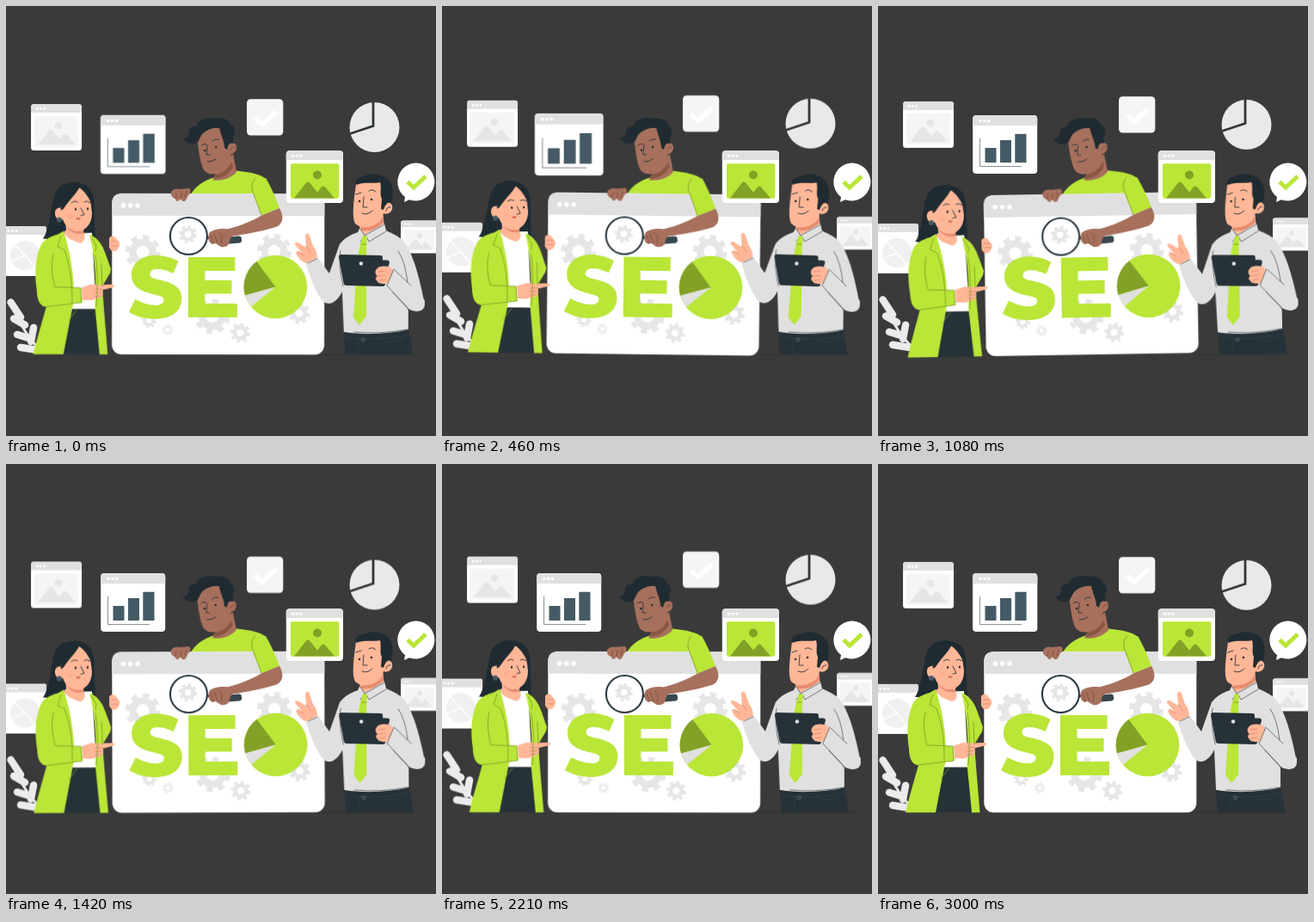
Recreate the animation shown at these times as an HTML page. Size 500 px wide and 500 px high, loop 3040 ms.

```html
<!DOCTYPE html>
<html lang="en">
<head>
<meta charset="utf-8">
<title>SEO team</title>
<style>
  html, body { margin: 0; width: 100%; height: 100%; overflow: hidden; background: #3a3a3a; }
  svg { display: block; width: 100vw; height: 100vh; }

  .sway { animation: sway 1520ms linear -35ms infinite; transform-origin: 250px 250px; }
  .sway.solo { transform-origin: 420px 250px; }
  .float { animation: float 1520ms linear infinite; }
  .beat { animation: beat 3040ms linear infinite; transform-origin: 147.7px 161px; }

  @keyframes sway {
    0%, 100% { transform: rotate(0deg); }
    25% { transform: rotate(1deg); }
    75% { transform: rotate(-1deg); }
  }
  @keyframes float {
    0%, 100% { transform: translateY(0); }
    48% { transform: translateY(-6.8px); }
    70.4% { transform: translateY(-3.2px); }
    97% { transform: translateY(-.2px); }
  }
  @keyframes beat {
    0% { transform: scale(1.007); }
    10% { transform: scale(1.09); }
    27%, 98% { transform: scale(1); }
    100% { transform: scale(1.005); }
  }

  .lime { fill: #b9e637; }
  .olive { fill: #82a126; }
  .navy { fill: #263238; }
  .hair { fill: #1f2b31; }
  .white { fill: #fff; }
  .bar { fill: #e0e0e0; }
  .pane { fill: #f5f5f5; }
  .hill { fill: #e6e6e6; }
  .shirt { fill: #e0e0e0; }
  .peach { fill: #ffb797; }
  .brown { fill: #a6705d; }
  .ink { fill: none; stroke: #263238; stroke-width: .9; stroke-linecap: round; stroke-linejoin: round; }
  .fold { fill: none; stroke: #7d9c25; stroke-width: .8; stroke-linecap: round; }
  .crease { fill: none; stroke: #263238; stroke-width: .6; stroke-linecap: round; }
  .knuckle { fill: none; stroke: #dd8269; stroke-width: .8; stroke-linecap: round; }
  .dusk { fill: none; stroke: #764938; stroke-width: .8; stroke-linecap: round; }
</style>
</head>
<body>
<svg viewBox="0 0 500 500" role="img" aria-label="SEO">
  <defs>
    <g id="gear" fill="none" stroke="#e6e6e6">
      <circle r="5.6" stroke-width="4"/>
      <circle r="8.4" stroke-width="3.2" pathLength="16" stroke-dasharray="1.05 .95"/>
    </g>
    <g id="dots" class="white">
      <circle r="1.7"/><circle cx="5" r="1.7"/><circle cx="10" r="1.7"/>
    </g>
    <path id="peaks" d="M0 25L14 7Q16 5 18 7L27 18L32 12Q34 10 36 12L47 25Z"/>
  </defs>

  <path d="M366 405.3H480" stroke="#303030" stroke-width=".7"/>

  <!-- Drifting windows, plant and pie chart -->
  <g class="float">
    <rect x="-6" y="256" width="53" height="58" rx="3" class="white"/>
    <path d="M-6 266V259Q-6 256-3 256H44Q47 256 47 259V266Z" class="bar"/>
    <use href="#dots" transform="translate(3 261.5) scale(.9)"/>
    <circle cx="22" cy="290" r="17" fill="#f0f0f0"/>
    <path d="M22 290L10 278M22 290L6 297M22 290L33 303" fill="none" stroke="#fff" stroke-width="1.6"/>

    <rect x="29" y="114" width="59" height="54" rx="3.5" class="white"/>
    <path d="M29 124V117.5Q29 114 32.5 114H84.5Q88 114 88 117.5V124Z" class="bar"/>
    <use href="#dots" transform="translate(36 119.500) scale(.85)"/>
    <rect x="33" y="128" width="51" height="36" rx="1.5" class="pane"/>
    <use href="#peaks" transform="translate(37 138) scale(.93)" class="hill"/>
    <circle cx="61" cy="139" r="4.3" class="hill"/>

    <rect x="280" y="108.300" width="42.300" height="42.300" rx="4.5" class="pane"/>
    <path d="M289.500 130L298 138L314 122.500" fill="none" stroke="#fff" stroke-width="5.5"/>

    <rect x="459" y="249.500" width="48" height="38" rx="3" class="white"/>
    <path d="M459 257V252.5Q459 249.5 462 249.5H507V257Z" class="bar"/>
    <use href="#dots" transform="translate(464 253.500) scale(.65)"/>
    <rect x="463" y="260.500" width="35" height="23.500" rx="1" class="pane"/>
    <use href="#peaks" transform="translate(465.500 267) scale(.65)" class="hill"/>
    <circle cx="481" cy="267" r="3" class="hill"/>

    <g fill="none" stroke="#ebebeb" stroke-linecap="round">
      <path d="M8 347Q18 380 42 402" stroke-width="3"/>
      <path d="M5.500 344.500L17 362M9 363.500L22 371M13 382L29 387M17 397L36 400M32 374L29 390" stroke-width="8.5"/>
    </g>

    <circle cx="428.500" cy="141" r="29" fill="#e9e9e9"/>
    <path d="M427 111.500V139.500L400 148.500" fill="none" stroke="#303638" stroke-width="2.8"/>
  </g>

  <!-- Bar chart -->
  <g class="beat">
    <rect x="110.200" y="127" width="75" height="68" rx="4" class="white"/>
    <path d="M110.200 139V131Q110.200 127 114.200 127H181.200Q185.200 127 185.200 131V139Z" class="bar"/>
    <use href="#dots" transform="translate(118.700 133.500)"/>
    <path d="M118.500 154V186.500H167" fill="none" stroke="#78858b" stroke-width=".9"/>
    <path d="M124.500 165H137.500V182H124.500ZM142 156H155V182H142ZM159.300 148.700H172.500V182H159.300Z" fill="#455a64"/>
  </g>

  <g class="sway">
    <!-- Man behind the board -->
    <path class="lime" d="M213 222C220 209 231 202 244 199L268 191.5C284 193 297 196 302 201L310 222Z"/>
    <path class="brown" d="M246 190L264 172L268 193C262 200 251 204 240 202.5Z"/>
    <path d="M243 196C253 194 259 189 262 181L264 187C259 196 250 201 242 201Z" fill="#8a5745"/>
    <path class="brown" d="M222 152C224 170 226 184 230 191C236 198 246 196 252 191L260 180L262 172C268 171 270 163 266 160C262 157 258 160 257 163L254 145L240 138L228 142Z"/>
    <path class="hair" d="M223 158C216 163 209 160 205 153C209 155 212 152 213 148C211 143 217 139 221 140C224 131 234 128 243 131C252 129 261 133 261 138C267 141 267 148 264 152L264 160C260 158 258 161 257 167L254 165C254 158 250 151 248 142C240 141 232 145 228 149C226 151 225 155 223 158Z"/>
    <path class="ink" d="M227 162Q230 159 233 161M240 157Q243 154 247 155M234 162L233 173L237 173M234 181Q239 182 244 178"/>
    <circle cx="231" cy="168" r="1.200" class="hair"/><circle cx="244" cy="164" r="1.200" class="hair"/>
    <path class="dusk" d="M261 167Q263 163 266 164"/>

    <!-- Board -->
    <rect x="123.300" y="218.300" width="247" height="187" rx="11" class="white"/>
    <path class="bar" d="M123.300 244V229.300Q123.300 218.300 134.300 218.300H359.300Q370.300 218.300 370.300 229.300V244Z"/>
    <use href="#dots" transform="translate(136.500 232) scale(1.650)"/>
    <use href="#gear" transform="translate(159 286.500) scale(2.050)"/>
    <use href="#gear" transform="translate(312 285) scale(2)"/>
    <use href="#gear" transform="translate(240 361) scale(2.050)"/>
    <use href="#gear" transform="translate(272.500 380) scale(1.150)"/>
    <use href="#gear" transform="translate(341 357) scale(1.250)"/>
    <use href="#gear" transform="translate(166.500 366) scale(.85)"/>
    <use href="#gear" transform="translate(188 376.500) scale(.65)" opacity=".7"/>

    <!-- Lettering, with a pie as the O -->
    <g transform="translate(-.5 -1)">
      <g class="lime">
        <path d="M201 298C192 293 183 291 175 291C157 291 146.500 301 146.500 314C146.500 329 160 333 171 336C180 338 184 339 184 343C184 347 180 349 174 349C166 349 158 346 151 342L143.500 357C151 362 162 365 174 365C193 365 205 356 205 341C205 327 193 323 181 320C172 318 168 317 168 313C168 309 171 307 177 307C183 307 189 309 195 312Z"/>
        <path d="M212.500 293H267V309H232V320H263V335.500H232V347H269.500V363H212.500Z"/>
        <circle cx="314" cy="327.500" r="36.800"/>
      </g>
      <path class="olive" d="M314 327.500L292 298A36.800 36.800 0 0 0 278.500 337.500Z"/>
      <path class="shirt" d="M314 327.500L278.500 337.500A36.800 36.800 0 0 0 285.500 350.700Z"/>
    </g>

    <!-- Arm, magnifier and gripping fingers -->
    <path class="lime" d="M274 204L302 200C309 212 315 226 318 235L297 243.500L287 218Z"/>
    <path class="brown" d="M297 243.500L318 235C323 244 323 252 315 256.500C302 261 285 264 268 267L257 268L254 260C270 257 286 250 297 243.500Z"/>
    <path class="fold" d="M286 213Q285 204 290 200M297 243L286 213"/>
    <path d="M234 269.500L262 271" stroke="#263238" stroke-width="3"/>
    <rect x="256" y="268" width="18" height="8" rx="3" fill="#37474f" transform="rotate(-4 265 272)"/>
    <path class="brown" d="M237 263C243 259 253 258 258 260L267 264L261 270L259 277C256 281 251 281 248 279L244 276L240 277C235 275 234 268 237 263Z"/>
    <path class="dusk" d="M238 267L241 275M242 265L246 276M248 264Q253 267 250 276"/>
    <circle cx="212.400" cy="267.500" r="21.500" fill="#fff" stroke="#2b3940" stroke-width="2.100"/>
    <use href="#gear" transform="translate(211.500 265.500) scale(1.060)"/>
    <path class="brown" d="M192 217C193 213 198 212 202 213L213 212C216 215 214 219 212 220L209 226C206 229 204 226 203 224C201 228 197 228 197 224C194 224 191 220 192 217Z"/>
    <path class="dusk" d="M198 218L197 224M204 217L203 224M210 216L208 223"/>

    <!-- Woman -->
    <path class="hair" d="M61 212C70 202 92 203 99 215C104 224 102 237 103 250L104 271H43C50 260 51 244 54 231C55 222 57 216 61 212Z"/>
    <path class="white" d="M66 265L100 264L105 353H72Z"/>
    <path class="peach" d="M69 247L91 253L90 263C93 268 92 273 87 276C77 274 68 268 67 263L70 261Z"/>
    <path d="M73 256Q80 263 90 262L90 265Q78 267 71 258Z" fill="#e88c70"/>
    <path class="peach" d="M63 235C57 234 55 242 59 247C62 251 65 250 66 248C69 258 77 263 85 262C94 261 100 252 100 241L98 224C94 216 88 212 82 211L68 222Z"/>
    <path class="hair" d="M86 210C81 220 73 226 67 236L64 238C63 230 60 225 66 214C73 206 82 206 86 210ZM84 210C90 215 97 222 100 233L102 224L93 209Z"/>
    <circle cx="62" cy="249" r="3" fill="#455a64"/>
    <path class="ink" d="M76 229Q79 226 83 228M91 228Q95 226 98 229M87 235L91 243L87 244"/>
    <path d="M81 247Q84 246 87 247Q84 251 81 247Z" fill="#d9604c"/>
    <ellipse cx="81" cy="236.500" rx="1.100" ry="1.600" class="hair"/><ellipse cx="95" cy="236" rx="1.100" ry="1.600" class="hair"/>
    <circle cx="75" cy="245" r="3" fill="#f79d80" opacity=".4"/>
    <path class="navy" d="M77 352.500H104L110 405.300H66Z"/>
    <path class="lime" d="M97 266C106 269 112 277 116 289L122 306L121 311L112 326L114 352L118.500 405.300H109L103.500 349C106 320 103 288 97 266Z"/>
    <path class="lime" d="M67 262C76 290 81 322 78 348L67 405.300H32C37 384 43 365 47 350C39 350 36 340 36 331C33 312 34 294 40 280C43 272 52 268 60 266Z"/>
    <path class="lime" d="M41 328H87L89 345L48 350C41 350 37 344 37 335Z"/>
    <path class="peach" d="M88 327.500L99 324L109 324.500L124 324C127 324.500 127 326.500 124 327.500L112 330.500C114 333 112 339 109 340L99 342.500L89 342Z"/>
    <path class="knuckle" d="M103 330L112 329.500M103 334L111 333.500M103 338L110 337.500"/>
    <path class="fold" d="M55 289Q51 306 57 327L87 328L88 345L47 350M64 268L60 280L68 284Q78 310 77 346M100 270L105 279L104 285M104 290Q108 314 105 350M111 300L112 326M73 366L82 354"/>
    <path class="peach" d="M120 270C123 266 128 268 129 272C133 274 133 279 131 281C130 285 125 287 122 284L120 281Z"/>
    <path class="knuckle" d="M122 274L129 274M122 279L130 279"/>
  </g>

  <!-- Picture window -->
  <rect x="325.800" y="168.300" width="66.200" height="60.700" rx="4" class="white"/>
  <path class="bar" d="M325.800 179V172.300Q325.800 168.300 329.800 168.300H388Q392 168.300 392 172.300V179Z"/>
  <use href="#dots" transform="translate(333.500 174.300) scale(.9)"/>
  <rect x="331" y="183.300" width="56.300" height="40.500" rx="2" class="lime"/>
  <use href="#peaks" class="olive" transform="translate(335 198.500)"/>
  <circle cx="362" cy="196.500" r="5" class="olive"/>

  <!-- Speech bubble -->
  <path class="white" d="M477.500 182.500A22 22 0 1 1 469 225.200L463 228L464 222A22 22 0 0 1 477.500 182.500Z"/>
  <path d="M467 204.500L474 211L488 198" fill="none" stroke="#b9e637" stroke-width="5"/>

  <!-- Man with tablet -->
  <g class="sway solo">
    <path class="navy" d="M393 376L468 374L473.500 405.300H394.500Z"/>
    <path class="shirt" d="M414 262C404 264 394 269 388 277L376 311L363 293L349 300C354 318 363 339 371 345C379 349 387 341 391 332L393 379C416 383 449 381 468 376L468 352C479 358 487 354 487 347C482 321 475 291 463 274C457 267 447 264 438 259Z"/>
    <path class="crease" d="M389 284Q386 299 392 326M362 294L351 299M456 285Q464 296 467 321M450 333L466 350L468 353M405 379Q435 382 467 376"/>
    <path class="peach" d="M412 250L438 238L440 259L419 268L411 261Z"/>
    <path d="M413 257Q428 259 438 245L439 251Q430 263 413 261Z" fill="#e88c70"/>
    <path class="peach" d="M407 207C404 229 402 245 406 253C413 260 428 258 436 249L439 241C446 244 452 236 448 230C445 227 441 229 439 233L438 202L416 200Z"/>
    <path class="hair" d="M408 208C403 203 410 199 416 198C425 192 442 196 447 205C451 213 450 222 448 230C445 226 441 230 439 237L436 236L437 224C434 219 437 212 435 205C426 207 415 204 408 208Z"/>
    <path class="ink" d="M407 219L413 217M422 215Q426 212 430 216M416 222L415 234L420 234M414 241Q420 244 426 238M442 238Q443 233 447 234"/>
    <circle cx="411" cy="227" r="1.300" class="hair"/><circle cx="425" cy="225" r="1.300" class="hair"/>
    <path class="shirt" d="M411 259L417 266L440 253L442 261L421 273L417 268L412 274L408 265Z"/>
    <path class="crease" d="M412 259L417 267L440 254M417 267L412 274M419 268L422 274L442 262"/>
    <path class="lime" d="M415 267L420 268L419 278L419 361L411 371L404 362L409 292L412 277Z"/>
    <path class="fold" d="M413 277L419 277"/>

    <path class="peach" d="M350 299C343 298 339 292 337 287C339 284 342 286 345 288L337 279C334 275 338 274 341 276L349 281L348 268C348 264 352 263 353 267L357 279C361 284 362 289 362 293Z"/>
    <path class="knuckle" d="M349 280Q353 282 354 287M339 285L346 290"/>

    <path class="navy" d="M390 289L436 290Q438 290 438 293V295.500H443Q446 295.500 446 298L444 306L441 323Q441 326 438 326L396 325Q393 325 392.500 322L387 292Q387 289 390 289Z"/>
    <circle cx="413" cy="299.500" r="2.200" fill="#e0e0e0"/>
    <path class="peach" d="M431 306C433 302 440 302 446 303L453 309L449 321L441 323C437 323 433 323 432 320C429 318 430 315 432 314C429 312 429 308 431 306Z"/>
    <path class="knuckle" d="M433 309L441 308M433 314L441 313M434 319L441 318"/>
    <path class="shirt" d="M451 306L487 342C488 353 480 356 470 353L443 325Z"/>
    <path class="crease" d="M451 306L443 325L469 353M452 307L471 325"/>
    <path d="M396 385Q426 390 469 383M437 389Q455 392 462 386" fill="none" stroke="#35434a" stroke-width=".7"/>
    <circle cx="415.500" cy="388" r="2" fill="none" stroke="#65737a" stroke-width=".8"/>
    <path d="M410 387V405" stroke="#35434a" stroke-width=".7"/>
  </g>
</svg>
</body>
</html>
```
